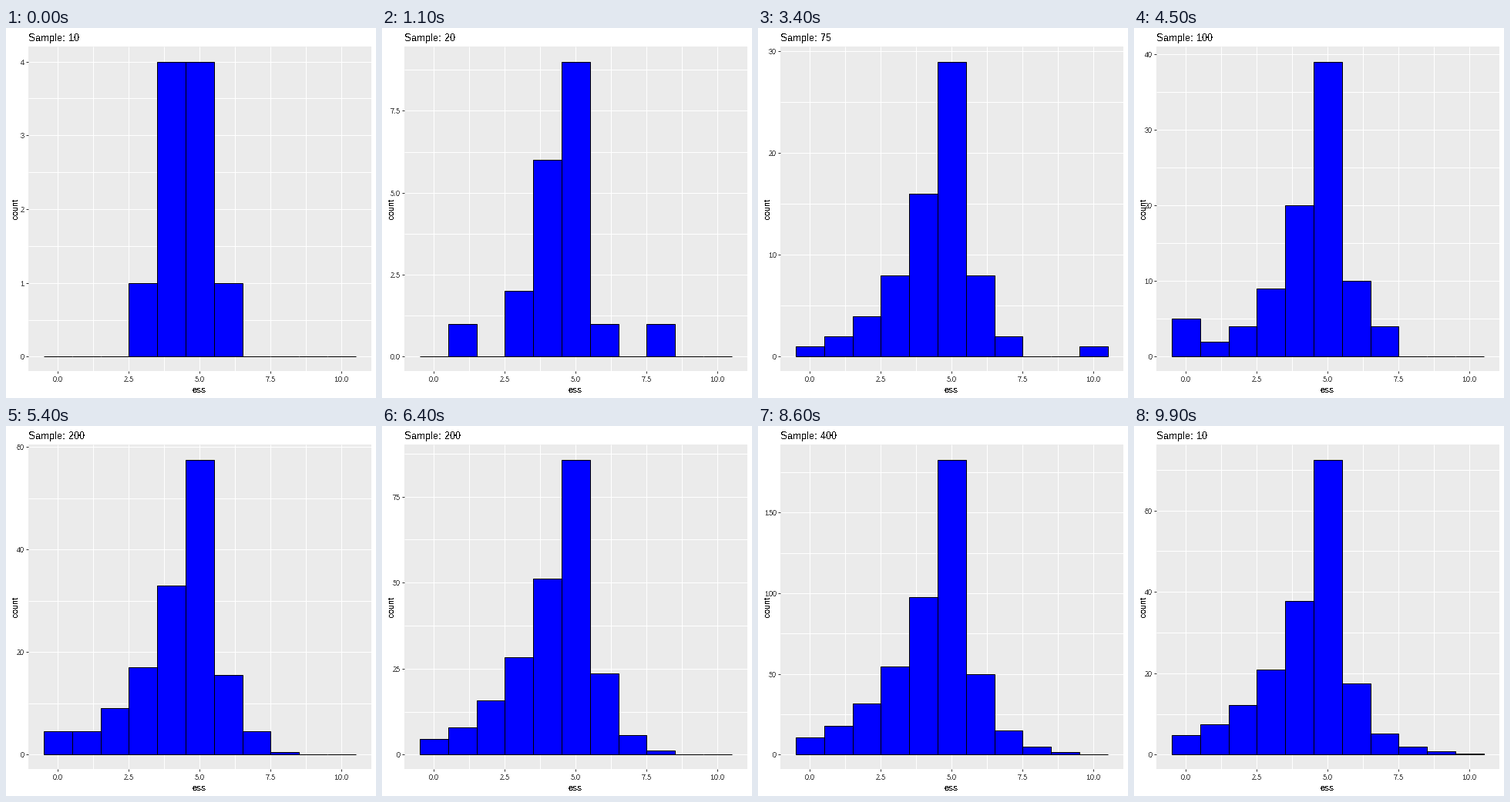
Write a matplotlib script that moves like this. It is 480 by 480 pixels and loops after 10 s.

```python
import math

import matplotlib.pyplot as plt
from matplotlib.animation import FuncAnimation
from matplotlib.patches import Rectangle

plt.rcParams["font.family"] = ["Liberation Sans", "DejaVu Sans"]
plt.rcParams["text.hinting"] = "native"
plt.rcParams["text.hinting_factor"] = 1
plt.rcParams["text.antialiased"] = False

SIZE, FRAMES, STEP_MS = 480, 100, 100
LEFT, RIGHT, TOP, BOTTOM = 29, 474, 24, 445
X0, X_UNIT = 67.45, 36.78
Y0, Y_MAX = 426.4, 43.6
MODE = 5
STEPS = (1, 5, 2, 2.5, 4, 3)


def bell(peak, left, right, power, extra=()):
    """Counts of 0 to 10, falling off on both sides of the mode."""
    extra = dict(extra)

    def count(v):
        rate = left if v < MODE else right
        fall = math.exp(-rate * abs(v - MODE) ** power)
        return round(peak * fall) + extra.get(v, 0)

    return [count(v) for v in range(11)]


# The tails get longer (lower power) as the sample grows.
SAMPLES = {
    10: bell(4, 0.1, 1.4, 3.8),
    20: bell(9, 0.405, 2.2, 2, {1: 1, 8: 1}),
    50: bell(13, 0.2, 0.955, 1.4, {3: 3, 4: -3, 10: 1}),
    75: bell(29, 0.6, 1.3, 1.1, {10: 1}),
    100: bell(39, 0.668, 1.36, 1.1, {0: 4, 7: 2}),
    200: bell(76, 0.51, 1.27, 1.1),
    300: bell(115, 0.54, 1.3, 1.05),
    400: bell(151, 0.59, 1.24, 1),
    700: bell(278, 0.69, 1.43, 0.84),
}
SIZES = list(SAMPLES)
STARTS = (8, *range(20, FRAMES, 11))  # when each sample begins to change
MOVE = 4

fig = plt.figure(figsize=(SIZE / 72, SIZE / 72), dpi=72, facecolor="white")
ax = fig.add_axes([0, 0, 1, 1])


def sample_at(i):
    """Label and linearly blended counts at step i."""
    k = next(k for k, start in enumerate(STARTS) if i < start + MOVE)
    t = max(0, (i - STARTS[k] + 1) / MOVE)
    now, nxt = SIZES[k], SIZES[(k + 1) % len(SIZES)]
    counts = [a + (b - a) * t for a, b in zip(SAMPLES[now], SAMPLES[nxt])]
    return (now if t < 0.5 else nxt), counts


def tick_step(top):
    """Best step by simplicity, coverage and density, about five labels."""
    lo, hi = -0.05 * top, 1.05 * top
    best, best_score = 1, -math.inf
    power = math.floor(math.log10(top))
    for z in (power - 1, power):
        for rank, q in enumerate(STEPS):
            step = q * 10.0 ** z
            for n in range(2, 10):
                last = step * (n - 1)
                simple = 1 - rank / (len(STEPS) - 1)
                miss = ((hi - last) ** 2 + lo ** 2) / (0.1 * (hi - lo)) ** 2
                ratio = (max(last, hi) - lo) / (4 * step)
                dense = 2 - max(ratio, 1 / ratio)
                score = 0.25 * simple + 0.2 * (1 - miss / 2) + 0.5 * dense
                if score > best_score:
                    best, best_score = step, score
    return best


def line(xs, ys, color, z):
    ax.plot(xs, ys, color=color, lw=1, zorder=z, solid_capstyle="butt", snap=True)


def text(x, y, s, size, color="black", **kw):
    ax.text(x, y, s, fontsize=size, color=color, va="baseline", zorder=6, **kw)


def tick_text(x, y, s, ha):
    text(x, y, s, 9, "#4D4D4D", ha=ha)


def draw_x_axis():
    for k in range(9):
        x = X0 + X_UNIT * 1.25 * k
        line([x, x], [TOP, BOTTOM], "white", 3 - k % 2)
        if k % 2 == 0:
            line([x, x], [BOTTOM, BOTTOM + 3], "#333333", 5)
            tick_text(x, 459, f"{1.25 * k:.1f}", "center")


def draw_y_axis(top, scale):
    step = tick_step(top)
    digits = 0 if abs(step - round(step)) < 1e-9 else 1
    for k in range(int(top * 1.05 / (step / 2)) + 1):
        value = step * k / 2
        y = Y0 - value * scale
        line([LEFT, RIGHT], [y, y], "white", 3 - k % 2)
        if k % 2 == 0:
            line([LEFT - 3, LEFT], [y, y], "#333333", 5)
            tick_text(24, round(y) + 4, f"{value:.{digits}f}", "right")


def draw(i):
    size, counts = sample_at(i)
    top = max(counts)
    scale = (Y0 - Y_MAX) / top

    ax.clear()
    ax.set_xlim(0, SIZE)
    ax.set_ylim(SIZE, 0)
    ax.axis("off")
    ax.add_patch(Rectangle((LEFT, TOP), RIGHT - LEFT, BOTTOM - TOP,
                           fc="#EBEBEB", lw=0, zorder=1))
    draw_x_axis()
    draw_y_axis(top, scale)
    for v, count in enumerate(counts):
        x = X0 + X_UNIT * (v - 0.5)
        ax.add_patch(Rectangle((x, Y0), X_UNIT, -count * scale, fc="blue",
                               ec="black", lw=1, zorder=4, snap=True))
    text(LEFT, 17, f"Sample: {size}", 13, ha="left")
    text(251, 473, "ess", 11, ha="center")
    text(15, 235, "count", 11, ha="center", rotation=90, rotation_mode="anchor")
    return []


anim = FuncAnimation(fig, draw, frames=FRAMES, interval=STEP_MS,
                     init_func=lambda: [], repeat=True, repeat_delay=0)
plt.show()
```
